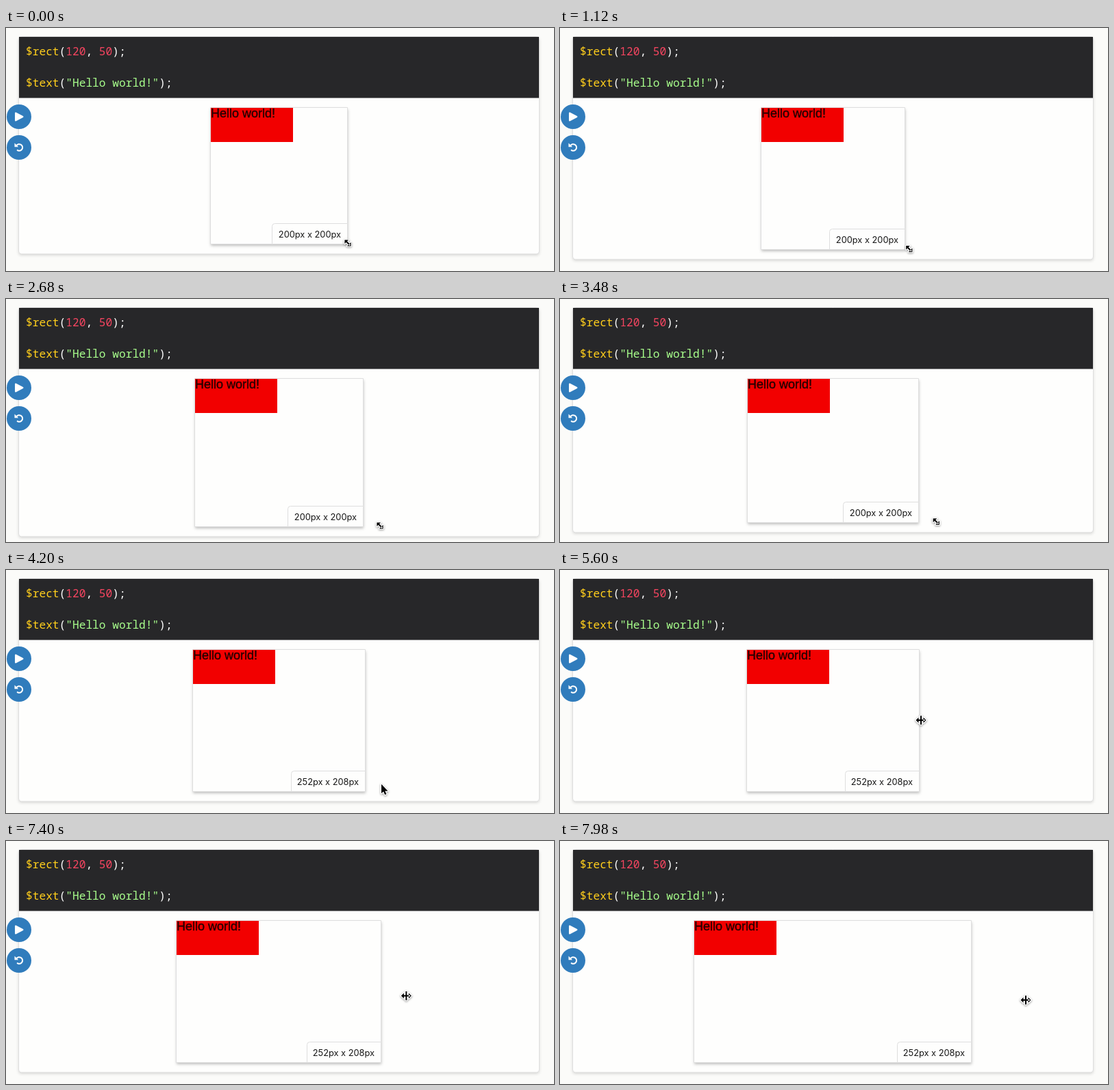
These frames come from a looping animation (800x356 px, 8000 ms). An HTML page with a canvas:

```html
<!DOCTYPE html>
<html lang="en">
<head>
<meta charset="utf-8">
<title>Resizable canvas</title>
<style>
html, body { margin: 0; width: 100%; height: 100%; overflow: hidden; background: #fbfbf9 }
canvas { display: block }
</style>
</head>
<body>
<canvas id="stage" width="800" height="356"></canvas>
<script>
const ctx = document.getElementById('stage').getContext('2d');
const LOOP = 8000, RELEASE = 4000, EDGE = 5000, GRAB = 6160, LAG = 40;
const CENTER = 398.75, TOP = 116.5;
const PAGE = '#fbfbf9', PAPER = '#fefefd', LINE = '#dedede';
const YELLOW = '#ffce1c', PINK = '#f54560', GREEN = '#a8ff8c', WHITE = '#fff';

// Where the hand turns: time, x, y
const turns = [
  [400, 499, 315], [1940, 522, 333.5], [2680, 546, 332], [3900, 551, 323],
  [4200, 548, 314], [4500, 542, 238], [5300, 527, 220], [GRAB, 527, 220],
  [6880, 573, 225], [7360, 574, 226], [7780, 680, 233]
];

const clamp = v => Math.min(1, Math.max(0, v));
const snap = v => Math.round(v) - 0.5;

// The sum of all legs, each one completed as far as the time allows
function pointer(t) {
  let [start, x, y] = turns[0];
  for (const [end, nextX, nextY] of turns.slice(1)) {
    const k = clamp((t - start) / (end - start));
    x += (nextX - x) * k;
    y += (nextY - y) * k;
    if (k < 1) break;
    start = end;
  }
  return [x, y];
}

function boxSize(t) {
  if (t >= GRAB) return [252 + pointer(t - LAG)[0] - 527, 208];
  const [x, y] = pointer(Math.min(t - LAG, RELEASE - 100));
  return [200 + x - 499, 200 + y - 315];
}

function text(str, x, y, font, color) {
  ctx.font = font;
  ctx.fillStyle = color;
  ctx.fillText(str, x, y);
  return x + ctx.measureText(str).width;
}

function code(y, parts) {
  let x = 29;
  for (const [str, color] of parts) x = text(str, x, y, '500 16.2px "Noto Sans Mono", monospace', color);
}

function card(x, y, w, h, radii, shadow) {
  ctx.save();
  ctx.beginPath();
  ctx.roundRect(x, y, w, h, radii);
  ctx.shadowColor = `rgba(0,0,0,${shadow})`;
  ctx.shadowBlur = 4;
  ctx.shadowOffsetY = 2;
  ctx.fillStyle = PAPER;
  ctx.fill();
  ctx.shadowColor = 'transparent';
  ctx.strokeStyle = LINE;
  ctx.stroke();
  ctx.restore();
}

// Triangle with its tip at (x, 0), pointing away from or toward the origin
function head(path, x, depth, half) {
  path.moveTo(x, 0);
  path.lineTo(x - depth, -half);
  path.lineTo(x - depth, half);
  path.closePath();
}

function button(y, drawIcon) {
  ctx.save();
  ctx.translate(19, y);
  ctx.beginPath();
  ctx.arc(0, 0, 18, 0, 7);
  ctx.fillStyle = '#307cbc';
  ctx.fill();
  ctx.fillStyle = ctx.strokeStyle = WHITE;
  ctx.lineJoin = 'round';
  ctx.lineWidth = 2;
  drawIcon();
  ctx.restore();
}

function playIcon() {
  const icon = new Path2D();
  head(icon, 5.5, 10.5, 5.5);
  ctx.fill(icon);
  ctx.stroke(icon);
}

function undoIcon() {
  ctx.beginPath();
  ctx.arc(0.3, 0, 4.8, -2.6, 2.3);
  ctx.stroke();
  const tip = new Path2D();
  head(tip, 4, 4, 4);
  ctx.translate(-3.7, -3.7);
  ctx.rotate(Math.PI * 0.75);
  ctx.fill(tip);
}

function doubleArrow(reach, bar) {
  const path = new Path2D();
  path.rect(-reach + 2, -1, 2 * reach - 4, 2);
  path.rect(-1, -bar, 2, 2 * bar);
  for (const side of [-1, 1]) head(path, side * reach, side * 4, 4);
  return path;
}

function plainArrow() {
  return new Path2D('M0 0V13.5L3 10.8L5.2 15.6L7.5 14.6L5.3 10H9.5Z');
}

function drawPointer(t) {
  const diagonal = t < RELEASE;
  const shape = diagonal ? doubleArrow(6.5, 0) : t < EDGE ? plainArrow() : doubleArrow(7.5, 6.5);
  ctx.save();
  ctx.translate(...pointer(t));
  if (diagonal) ctx.rotate(Math.PI / 4);
  ctx.lineJoin = 'round';
  ctx.lineWidth = 2.5;
  ctx.strokeStyle = WHITE;
  ctx.shadowColor = 'rgba(0,0,0,.4)';
  ctx.shadowBlur = 3;
  ctx.shadowOffsetY = 1;
  ctx.stroke(shape);
  ctx.shadowColor = 'transparent';
  ctx.fillStyle = '#000';
  ctx.fill(shape);
  ctx.restore();
}

function drawBox(left, right, bottom, label, labelWidth) {
  card(left, TOP, right - left, bottom - TOP, 0, 0.25);
  ctx.fillStyle = '#f20000';
  ctx.fillRect(left + 0.5, 117, 120, 50);
  text('Hello world!', left + 0.5, 131, '18px "Liberation Sans", Arial, sans-serif', '#280000');
  ctx.strokeStyle = '#280000';
  ctx.lineWidth = 0.4;
  ctx.strokeText('Hello world!', left + 0.5, 131);
  ctx.lineWidth = 1;

  card(right - labelWidth, bottom - 30, labelWidth, 30, [4, 0, 0, 0], 0);
  ctx.textAlign = 'right';
  text(label, right - 9.5, bottom - 10, '12.8px Inter, sans-serif', '#161616');
  ctx.textAlign = 'left';
}

function draw(t) {
  const [w, h] = boxSize(t);
  const left = snap(CENTER - w / 2), right = snap(CENTER + w / 2), bottom = snap(TOP + h);
  ctx.fillStyle = PAGE;
  ctx.fillRect(0, 0, 800, 356);

  card(18.5, 12.5, 760, bottom + 2, 4, 0.15);
  ctx.fillStyle = '#272729';
  ctx.fillRect(19, 13, 759, 89.5);
  code(40, [['$rect', YELLOW], ['(', WHITE], ['120', PINK], [', ', WHITE], ['50', PINK], [');', WHITE]]);
  code(86, [['$text', YELLOW], ['(', WHITE], ['"Hello world!"', GREEN], [');', WHITE]]);

  if (t < RELEASE) drawBox(left, right, bottom, '200px x 200px', 110);
  else drawBox(left, right, bottom, '252px x 208px', 108);
  button(130, playIcon);
  button(175, undoIcon);
  drawPointer(t);
}

function tick() {
  draw(performance.now() % LOOP);
  requestAnimationFrame(tick);
}
tick();
</script>
</body>
</html>
```
